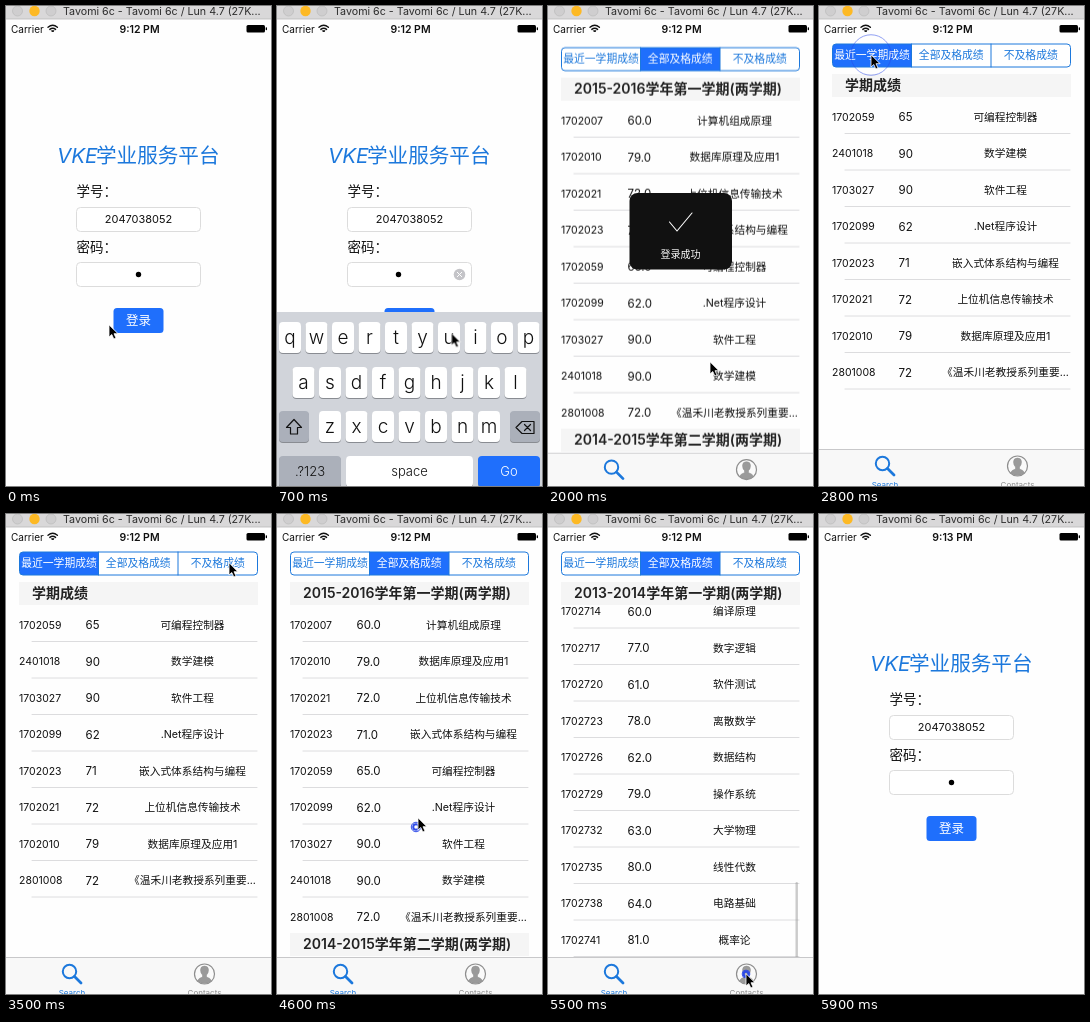
Write an HTML page that moves like this. It is 265 by 480 pixels and loops after 6000 ms.

```html
<!DOCTYPE html>
<html lang="zh">
<head>
<meta charset="utf-8">
<title>Grades app</title>
<style>
@property --s { syntax: '<length>'; inherits: true; initial-value: 0px; }
html, body { margin: 0; width: 100%; height: 100%; overflow: hidden; background: #fff; }
svg { display: block; width: 265px; height: 480px; }
text { font-family: Inter, "Noto Sans CJK SC", "Noto Sans CJK JP", sans-serif; white-space: pre; }
.mid { text-anchor: middle; }
.bold { font-weight: 600; }
.light { font-weight: 300; }

.anim { animation: 6s linear infinite; }
.step { animation: 6s step-end infinite; }
#keys { animation-name: keys; }
#clear { animation-name: clear; }
#dot { animation-name: dot; }
#app { animation-name: app; }
#all { animation-name: all; }
#recent { animation-name: recent; }
#failed { animation-name: failed; }
#list { animation-name: scroll; }
#hud { animation-name: hud; }
#t12 { animation-name: before; }
#t13 { animation-name: after; }
#arrow { animation-name: arrow; }
#rows { transform: translateY(calc(0px - var(--s))); }
#bar { transform: translateY(calc(var(--s) * .205)); animation-name: bar; }
.head { transform: translateY(clamp(0px, var(--s) - var(--top), var(--room))); }
.ring circle { opacity: 0; fill: none; stroke: #2947e8; animation: 6s linear infinite; animation-delay: inherit; }
.ring .outer { animation-name: outer; }
.ring .inner { animation-name: inner; stroke-width: 2; }

@keyframes keys {
  0%, 6.7% { transform: translateY(176px); animation-timing-function: ease-out; }
  11%, 24.2% { transform: none; animation-timing-function: ease-in; }
  27.5%, 100% { transform: translateY(176px); }
}
@keyframes clear { 0% { opacity: 0; } 7.5% { opacity: 1; } 25% { opacity: 0; } }
@keyframes dot { 0% { transform: none; } 7.5% { transform: translateX(-11px); } 25% { transform: none; } }
@keyframes app {
  0%, 26.67% { transform: translateY(480px); animation-timing-function: cubic-bezier(.215, .61, .355, 1); }
  34.5%, 93.5% { transform: none; animation-timing-function: ease-in-out; }
  97.5%, 100% { transform: translateY(480px); }
}
@keyframes all { 0% { opacity: 1; } 44.5% { opacity: 0; } 70% { opacity: 1; } }
@keyframes recent { 0% { opacity: 0; } 44.5% { opacity: 1; } 59.5% { opacity: 0; } }
@keyframes failed { 0% { opacity: 0; } 59.5% { opacity: 1; } 70% { opacity: 0; } }
@keyframes scroll {
  0%, 77.2% { --s: 0px; }
  80% { --s: 250px; }
  83% { --s: 560px; }
  85% { --s: 1059px; animation-timing-function: ease-out; }
  90%, 100% { --s: 1454px; }
}
@keyframes bar { 0%, 77% { opacity: 0; } 78%, 90% { opacity: 1; } 93%, 100% { opacity: 0; } }
@keyframes hud { 0%, 24.5% { opacity: 0; } 25.5%, 38% { opacity: 1; } 41%, 100% { opacity: 0; } }
@keyframes before { 0% { opacity: 1; } 93.5% { opacity: 0; } }
@keyframes after { 0% { opacity: 0; } 93.5% { opacity: 1; } }
@keyframes arrow {
  0%, 1% { transform: translate(103px, 319px); opacity: 1; }
  5%, 9% { transform: translate(150px, 268px); }
  18%, 25% { transform: translate(232px, 467px); }
  31%, 34% { transform: translate(162px, 356px); }
  42%, 48% { transform: translate(52px, 49px); }
  57%, 61% { transform: translate(223px, 49px); }
  67%, 71% { transform: translate(132px, 49px); }
  75.5%, 76.8% { transform: translate(141px, 304px); }
  79.5% { transform: translate(141px, 200px); }
  82.5%, 83.4% { transform: translate(141px, 264px); }
  85%, 86% { transform: translate(141px, 185px); }
  90%, 93% { transform: translate(198px, 460px); opacity: 1; }
  96% { transform: translate(275px, 470px); opacity: 1; }
  96.1%, 100% { transform: translate(275px, 470px); opacity: 0; }
}
@keyframes outer {
  0% { r: 2px; opacity: 1; }
  1.6% { r: 10.5px; opacity: .9; }
  4% { r: 27px; opacity: .25; }
  5%, 100% { r: 30px; opacity: 0; }
}
@keyframes inner {
  0% { r: 1.5px; opacity: 1; }
  1.6% { r: 5.5px; opacity: .9; }
  3%, 100% { r: 12px; opacity: 0; }
}
</style>
</head>
<body>
<svg id="stage" viewBox="0 0 265 480"></svg>
<script>
const BLUE = '#1f6ffc', LINK = '#1c78dc';
const TOP = 68.5, HEAD = 22.5, ROW = 36.5;

// Text placed by the middle of its line
const text = (x, y, size, str, cls = '', fill = '#111', more = '') =>
  `<text x="${x}" y="${y + size * .37}" font-size="${size}" class="${cls}" fill="${fill}" ${more}>${str}</text>`;
const box = (x, y, w, h, r, fill, more = '') =>
  `<rect x="${x}" y="${y}" width="${w}" height="${h}" rx="${r}" fill="${fill}" ${more}/>`;
const path = (d, stroke, width = 1, fill = 'none') =>
  `<path d="${d}" fill="${fill}" stroke="${stroke}" stroke-width="${width}" stroke-linecap="round" stroke-linejoin="round"/>`;
const disc = (x, y, r, fill, more = '') => `<circle cx="${x}" cy="${y}" r="${r}" fill="${fill}" ${more}/>`;

const field = y => box(70.5, y + .5, 124, 24, 4, '#fff', 'stroke="#dcdcdc"');

function login() {
  return box(0, 0, 265, 480, 0, '#fefefe') +
    `<text x="51" y="157" font-size="20.6" class="light" fill="${LINK}"><tspan font-style="italic" font-weight="400">VKE</tspan><tspan x="90">学业服务平台</tspan></text>` +
    text(70.5, 185.5, 13.5, '学号：') + field(201) + text(132.5, 213, 11, '2047038052', 'mid') +
    text(70.5, 241, 13.5, '密码：') + field(256) +
    `<g id="dot" class="step">${disc(132.5, 268.5, 2.7, '#000')}</g>` +
    `<g id="clear" class="step">${disc(182.5, 268.5, 5.8, '#c4c4c8')}${path('M180.3 266.3l4.4 4.4m0-4.4l-4.4 4.4', '#fff')}</g>` +
    box(107.5, 302, 50, 25, 3.5, BLUE) + text(132.5, 314.5, 12.5, '登录', 'mid light', '#fff');
}

function keyboard() {
  const key = (x, y, w, fill, label = '', size = 19, color = '#111') =>
    box(x, y + 1, w, 31, 4, '#898c92') + box(x, y, w, 31, 4, fill) +
    text(x + w / 2, y + 15, size, label, 'mid light', color);
  const line = (chars, x, y) => [...chars].map((c, i) => key(x + i * 26.5, y, 22, '#fff', c)).join('');
  const gray = '#abb0ba';
  return `<g id="keys" class="anim">` + box(0, 306, 265, 174, 0, '#d1d4da') +
    line('qwertyuiop', 2, 316) + line('asdfghjkl', 15.5, 361) + line('zxcvbnm', 42, 405) +
    key(2, 405, 30, gray) + path('M17 413.5l-7.5 8h4v6.5h7v-6.5h4z', '#111', 1.2) +
    key(233, 405, 30, gray) + path('M245 415.5h12v12h-12l-6-6zM247.5 418.5l6 6m0-6l-6 6', '#111', 1.2) +
    key(2, 450, 62, gray, '.?123', 13) + key(69, 450, 127, '#fff', 'space', 13) +
    key(201, 450, 62, BLUE, 'Go', 13, '#fff') + '</g>';
}

function segments(on) {
  const names = ['最近一学期成绩', '全部及格成绩', '不及格成绩'], edge = [13.5, 92.5, 172, 251.5];
  return `<g clip-path="url(#pill)">` + box(13, 38, 239, 24, 0, '#fff') +
    box(edge[on], 38, edge[on + 1] - edge[on], 24, 0, BLUE) + '</g>' +
    box(13.5, 38, 238, 23, 3.5, 'none', `stroke="${LINK}"`) +
    path('M92.5 38v23M172 38v23', LINK) +
    names.map((n, i) => text((edge[i] + edge[i + 1]) / 2, 49.5, 10.8, n, 'mid', i === on ? '#fff' : LINK)).join('');
}

function section(title, rows, top) {
  const h = HEAD + rows.length * ROW;
  const body = rows.map(([id, score, name], i) => {
    const y = HEAD + i * ROW;
    return text(13, y + 20, 10.5, id) + text(79.5, y + 20, 11.5, score) +
      text(186.5, y + 20, 10.7, name, 'mid') + path(`M26 ${y + ROW}H251`, '#d4d4d6', .8);
  }).join('');
  return `<g transform="translate(0 ${TOP + top})">${body}` +
    `<g class="head" style="--top:${top}px;--room:${h - HEAD}px">` +
    box(13, -.5, 239, HEAD + .5, 0, '#f5f5f5') + text(26, 10.7, 14, title, 'bold', '#222') + '</g></g>';
}

const course = s => s.split(' ');
const first = [
  '1702007 60.0 计算机组成原理', '1702010 79.0 数据库原理及应用1', '1702021 72.0 上位机信息传输技术',
  '1702023 71.0 嵌入式体系结构与编程', '1702059 65.0 可编程控制器', '1702099 62.0 .Net程序设计',
  '1703027 90.0 软件工程', '2401018 90.0 数学建模', '2801008 72.0 《温禾川老教授系列重要...'
].map(course);
const early = [
  '1701002 86.0 计算机程序设计基础（C）', '2401002 64.0 高等数学A下', '2501002 74.0 大学英语A2',
  '2601033 76.0 体育2（男篮）', '2704001 67.0 工程教育', '2801002 78.0 人文社会学基本原理',
  '3601001 85.0 健康教育'
].map(course);
const recent = [4, 7, 6, 5, 3, 2, 1, 8].map(i => [first[i][0], parseInt(first[i][1]), first[i][2]]);

const topics = course('离散数学 数据结构 操作系统 大学物理 线性代数 电路基础 概率论 计算机网络 编译原理 数字逻辑 软件测试');
const fill = (n, seed) => Array.from({ length: n }, (_, i) =>
  [1702011 + seed * 100 + i * 3, 60 + (i * 17 + seed * 7) % 33 + '.0', topics[(i + seed) % topics.length]]);

function allGrades() {
  const terms = [
    ['2015-2016学年第一学期', first],
    ['2014-2015学年第二学期', fill(10, 1)],
    ['2014-2015学年第一学期', [...fill(9, 4), course('2801003 80.0 中国近现代史纲要')]],
    ['2013-2014学年第二学期', early],
    ['2013-2014学年第一学期', fill(11, 7)]
  ];
  let top = 0;
  return terms.map(([name, rows]) => {
    const out = section(name + '(两学期)', rows, top);
    top += HEAD + rows.length * ROW;
    return out;
  }).join('');
}

function app() {
  const view = (id, on, body) =>
    `<g id="${id}" class="step">${box(0, 13, 265, 430, 0, '#fefefe')}${segments(on)}<g clip-path="url(#table)">${body}</g></g>`;
  return `<g id="app" class="anim">` + box(0, 0, 265, 480, 0, '#fefefe') +
    view('all', 1, `<g id="list" class="anim"><g id="rows">${allGrades()}</g>` +
      `<g id="bar" class="anim">${box(247.5, 70, 2.4, 77, 1.2, '#8a8a8a')}</g></g>`) +
    view('recent', 0, section('学期成绩', recent, 0)) +
    view('failed', 2, section('不及格成绩', [], 0)) +
    box(0, 443, 265, 40, 0, '#f8f8f8') + path('M0 443.5H265', '#bdbdbf', .8) +
    disc(63.5, 457.5, 6.7, 'none', `stroke="${LINK}" stroke-width="2"`) + path('M68.5 462.5l6.5 6.5', LINK, 2.8) +
    text(66, 479, 8, 'Search', 'mid', LINK) +
    disc(198.5, 460, 10, '#fafafa', 'stroke="#8e8e8e" stroke-width="1.2"') +
    path('M191.5 467q1-3 5-4v-2q-2-2-2-5a4 4 0 0 1 8 0q0 3-2 5v2q4 1 5 4q-7 5-14 0z', '#8e8e8e', .5, '#9a9a9a') +
    text(198.5, 479, 8, 'Contacts', 'mid', '#8e8e8e') + '</g>';
}

function chrome() {
  const clock = (id, str) => `<g id="${id}" class="step">${text(133.5, 23, 10.5, str, 'mid bold')}</g>`;
  const lamp = x => disc(x, 5, 5, '#cfcecf', 'stroke="#bbb" stroke-width=".7"');
  return box(0, 13, 265, 18, 0, '#fefefe') +
    text(5, 23, 10, 'Carrier') +
    path('M42 21.3q4.7-4 9.4 0M43.8 23.4q2.9-2.4 5.8 0', '#111', 1.4) + path('M45.7 25l1 1l1-1z', '#111', 1, '#111') +
    clock('t12', '9:12 PM') + clock('t13', '9:13 PM') +
    box(240.5, 19, 18.5, 7.5, 1.5, '#000') + box(259.7, 21.2, 1.3, 3, .6, '#000') +
    box(0, 0, 265, 13, 0, '#d9d8d9') + path('M0 13H265', '#b9b8b9', .8) +
    lamp(11.5) + disc(28.5, 5, 5.2, '#fdb924') + lamp(45) +
    text(57, 5.5, 10.7, 'Tavomi 6c - Tavomi 6c / Lun 4.7 (27K...', '', '#2c2c2c');
}

const hud = () => `<g id="hud" class="anim">` + box(81.5, 187, 102.5, 76.5, 8, '#111') +
  path('M121.5 216l7.5 9l15-18', '#fff', 1.1) + text(132.5, 248.5, 10, '登录成功', 'mid', '#fff') + '</g>';

// Press time in ms, then position
const presses = [[380, 150, 268], [1170, 232, 465], [2620, 52, 49], [3530, 223, 49],
  [4150, 132, 49], [4570, 139, 313], [5004, 142, 264], [5480, 198, 460]];
const ring = ([ms, x, y]) => `<g class="ring" transform="translate(${x} ${y})" style="animation-delay:${ms}ms">` +
  `<circle class="outer"/><circle class="inner"/></g>`;

document.getElementById('stage').innerHTML =
  `<defs><clipPath id="pill">${box(13.5, 38, 238, 23, 3.5, '#000')}</clipPath>` +
  `<clipPath id="table">${box(0, 68, 265, 375, 0, '#000')}</clipPath></defs>` +
  login() + keyboard() + app() + hud() + chrome() + presses.map(ring).join('') +
  `<g id="arrow" class="anim">${path('M0 0V12L2.8 9.5L4.8 14L7 13L5 8.7H8.7Z', '#fff', .8, '#000')}</g>`;
</script>
</body>
</html>
```
